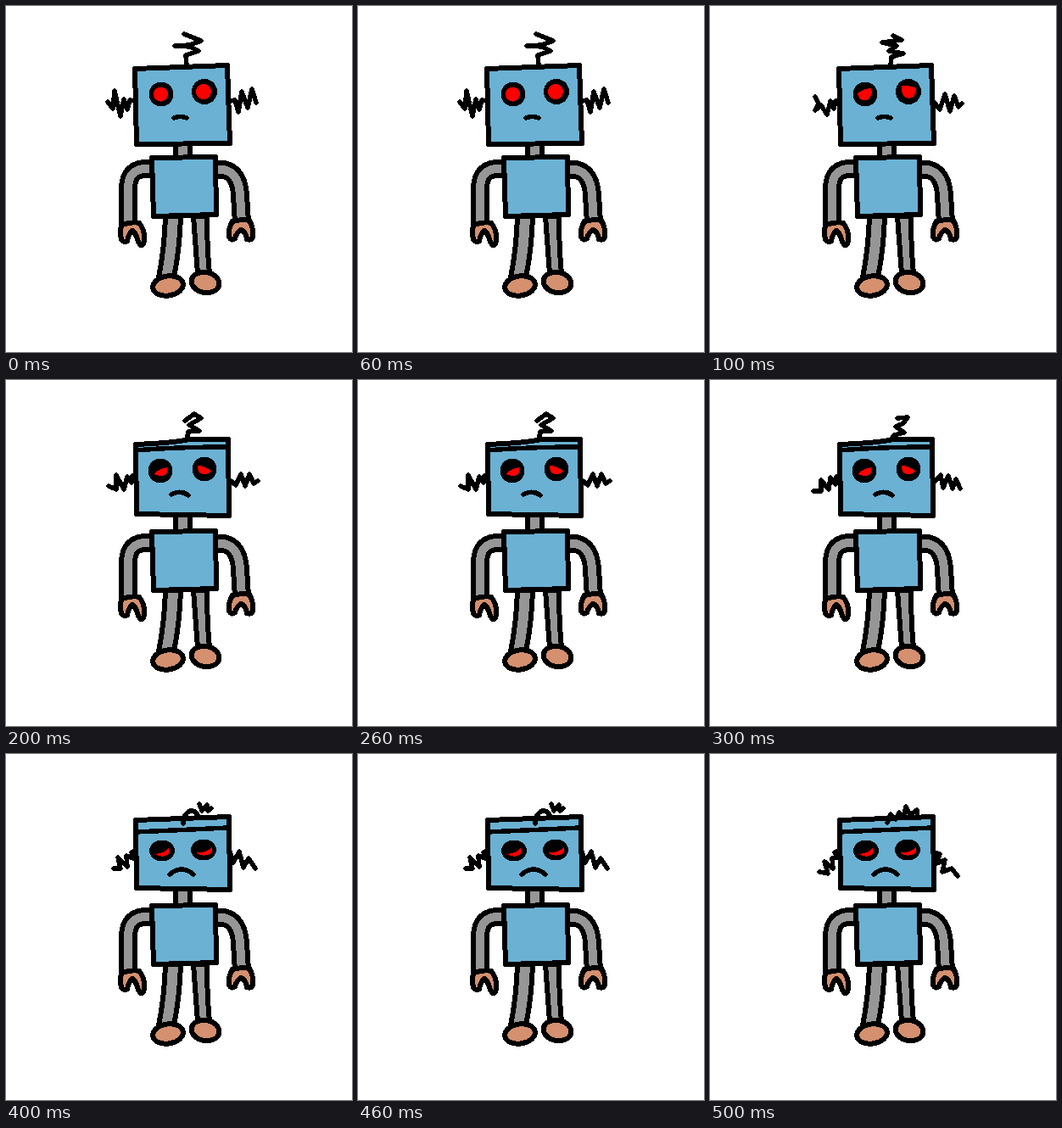
Write an HTML page that moves like this. It is 408 px wide and 408 px high and loops after 600 ms.

```html
<!DOCTYPE html>
<html lang="en">
<head>
<meta charset="utf-8">
<title>Sad robot</title>
<style>
  html, body { margin: 0; width: 100%; height: 100%; overflow: hidden; background: #fff; }
  svg { display: block; width: 100%; height: 100%; shape-rendering: crispEdges; }
  path, ellipse, circle { stroke-linecap: round; stroke-linejoin: round; }
  .line { fill: none; stroke: #000; stroke-width: 5.5; }
  .blue { fill: #6ab1d3; stroke: #000; stroke-width: 6; }
  .tan { fill: #d4906f; stroke: #000; stroke-width: 6; }
  .grey { fill: #969696; stroke: #000; stroke-width: 6; }
  .tube { fill: none; stroke: #000; stroke-width: 22; stroke-linecap: butt; }
  .core { fill: none; stroke: #969696; stroke-width: 10; stroke-linecap: butt; }
  .red { fill: #f00; }

  /* Each pose is held for one or two ticks of 100 ms */
  .one, .two {
    visibility: hidden;
    animation: one 600ms step-end infinite;
    animation-delay: calc(var(--at) * 100ms - 600ms);
  }
  .two { animation-name: two; }
  @keyframes one { 0% { visibility: visible; } 16.66667%, 100% { visibility: hidden; } }
  @keyframes two { 0% { visibility: visible; } 33.33333%, 100% { visibility: hidden; } }
</style>
</head>
<body>
<svg viewBox="0 0 408 408">
  <!-- body -->
  <path class="grey" d="M200 158V180H217V158Z"/>
  <path class="grey" d="M188 248Q187 285 180 320H198Q205 285 206 248Z"/>
  <path class="grey" d="M221 248L226 316H240Q237 285 237 248Z"/>
  <path class="tube" d="M173 192C151 190 144 199 144 216V258"/>
  <path class="core" d="M173 192C151 190 144 199 144 216V258"/>
  <path class="tube" d="M246 193C267 190 275 204 276 223L278 255"/>
  <path class="core" d="M246 193C267 190 275 204 276 223L278 255"/>
  <path class="blue" d="M172 179L247 178L248 246L174 248Z"/>
  <path class="tan" d="M137 258Q148 254 157 256Q163 263 163 273Q163 283 159 282Q156 280 154 272Q151 265 149 265Q145 268 143 277Q139 280 136 275Q133 264 137 258Z"/>
  <path class="tan" d="M267 254Q278 251 287 253Q292 261 291 272Q289 277 284 275Q282 265 277 264Q272 267 270 274Q266 278 263 272Q262 262 267 254Z"/>
  <ellipse class="tan" cx="191" cy="330" rx="18" ry="11.5" transform="rotate(-9 191 330)"/>
  <ellipse class="tan" cx="235" cy="326" rx="16.500" ry="12" transform="rotate(10 235 326)"/>

  <!-- awake head -->
  <g class="two" style="--at:0">
    <path class="blue" d="M152 74L261 70L264 162L154 163Z"/>
    <circle cx="183" cy="104" r="14.5"/>
    <circle cx="234" cy="101" r="15"/>
    <path class="line" d="M198 132Q206 129 213 132"/>
  </g>
  <!-- drowsy head -->
  <g class="two" style="--at:2">
    <path class="blue" d="M153 76Q200 74 216 70L262 70L263 160L154 158Z"/>
    <path class="line" d="M153 83Q200 79 262 79"/>
    <circle cx="182" cy="107" r="14.5"/>
    <circle cx="234" cy="105" r="14.5"/>
    <path class="red" d="M175 110Q182 104 190 103Q192 112 184 113Q176 113 175 110Z"/>
    <path class="red" d="M226 101Q234 101 242 107Q240 111 233 111Q225 110 226 101Z"/>
    <path class="line" d="M195 135Q206 129 215 136"/>
  </g>
  <!-- worn-out head -->
  <g class="two" style="--at:4">
    <path class="blue" d="M153 78L263 74L264 160L154 158Z"/>
    <path class="line" d="M153 92L262 87"/>
    <ellipse cx="184" cy="114" rx="15" ry="12.5"/>
    <ellipse cx="233" cy="113" rx="15" ry="12.5"/>
    <path class="red" d="M176 118Q187 117 192 111Q195 117 188 120Q181 122 176 118Z"/>
    <path class="red" d="M224 116Q236 117 243 110Q245 117 238 119Q229 121 224 116Z"/>
    <path class="line" d="M193 142Q207 130 221 142"/>
  </g>

  <!-- wires and pupils, tick by tick -->
  <g class="one" style="--at:0">
    <circle class="red" cx="182.500" cy="104" r="8.500"/>
    <circle class="red" cx="233" cy="101" r="9"/>
    <path class="line" d="M210 33L230 41L217 46L199 47L217 48L227 53L212 58L213 70M153 112L146 111L143 122L139 110L135 130L128 100L126 121L120 113M264 112L270 111L274 125L278 101L285 120L290 98L295 114"/>
  </g>
  <g class="one" style="--at:1">
    <path class="red" d="M174 103Q182 97 190 97Q193 106 185 111Q175 112 174 103Z"/>
    <path class="red" d="M226 94Q234 93 243 97Q243 107 235 109Q225 108 226 94Z"/>
    <path class="line" d="M216 35L226 40L203 43L220 47L211 53L228 56L214 60L213 70M153 112L148 112L146 121L142 112L138 128L131 117L124 123L128 115L124 107M264 113L271 122L277 104L283 124L288 106L293 119L297 115"/>
  </g>
  <g class="one" style="--at:2">
    <path class="line" d="M211 48L222 40L230 45L216 53L228 60L215 61L213 71M153 112L149 113L148 121L143 114L139 129L130 112L130 129L121 125M264 118L271 124L277 111L282 125L287 111L292 122L297 119"/>
  </g>
  <g class="one" style="--at:3">
    <path class="line" d="M221 45L233 44L228 51L219 55L229 62L217 65L213 71M153 113L149 114L148 123L142 115L140 129L131 118L131 131L122 131M264 121L272 112L275 127L281 113L286 128L290 117L295 128"/>
  </g>
  <g class="one" style="--at:4">
    <path class="line" d="M209 82Q208 72 217 67Q224 66 227 74M228 59L231 67L237 60L238 67L242 64M153 114L148 116L150 123L142 120L143 133L132 122L135 135L127 135M264 115L268 128L275 115L280 134L286 123L294 135"/>
  </g>
  <g class="one" style="--at:5">
    <path class="line" d="M209 81L213 71L219 77L223 69L228 75L231 62L236 72L244 66L245 74M153 113L147 116L152 122L144 123L145 135L135 127L139 141L129 139M264 116L271 118L267 129L277 125L274 139L285 135L292 144"/>
  </g>
</svg>
</body>
</html>
```
